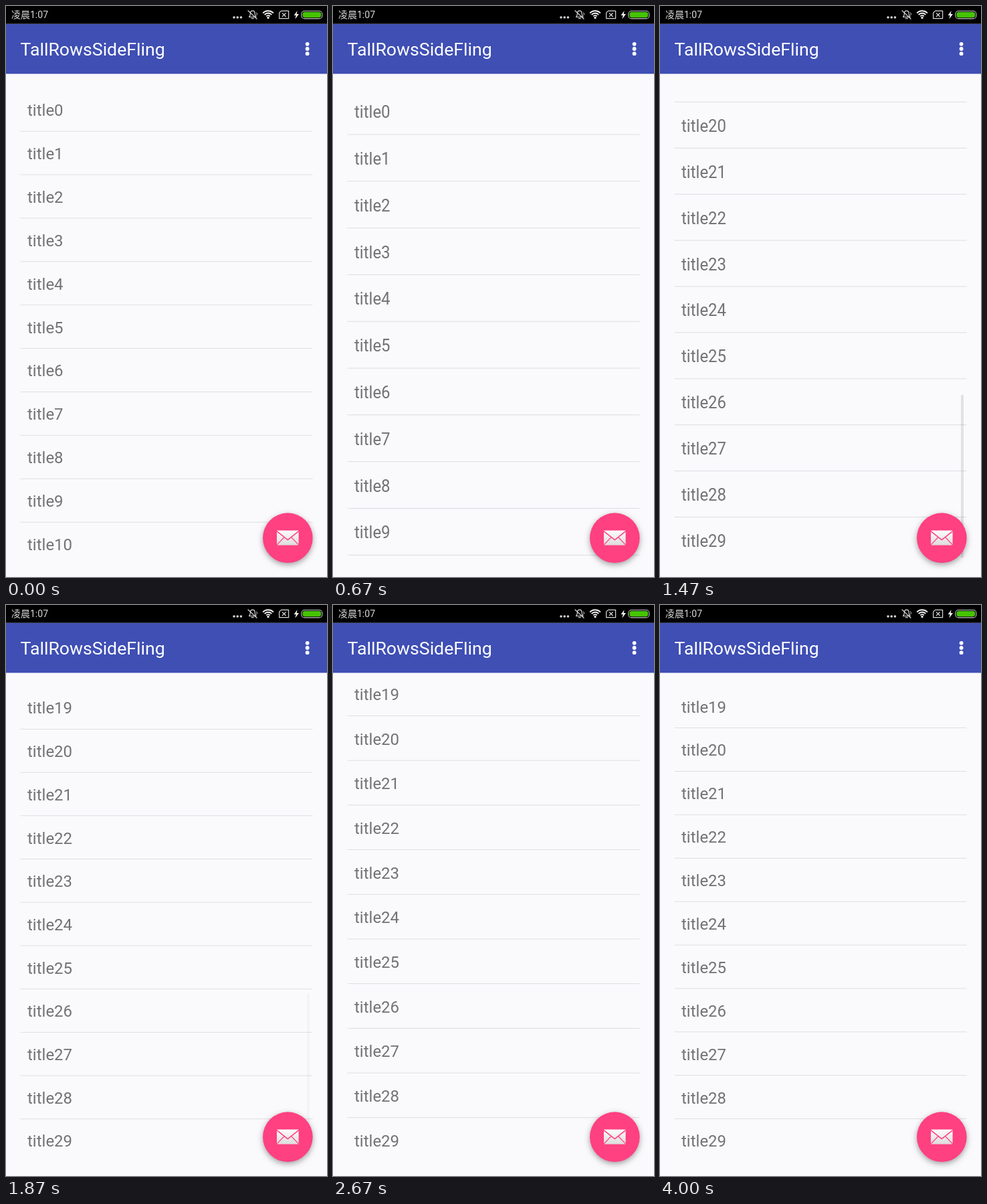
An HTML page with a canvas for the animation above (4.07 s loop, 480 by 853 pixels).

```html
<!DOCTYPE html>
<html lang="zh">
<head>
<meta charset="utf-8">
<title>Edge stretch list</title>
<style>
html, body { margin: 0; width: 100%; height: 100%; overflow: hidden; background: #faf9fc; }
canvas { display: block; width: 480px; height: 853px; }
</style>
</head>
<body>
<canvas id="stage"></canvas>
<script>
const W = 480, H = 853, LOOP = 4070, STEP = 1000 / 15;
const canvas = document.getElementById('stage');
const ctx = canvas.getContext('2d');
const dpr = window.devicePixelRatio || 1;
canvas.width = W * dpr;
canvas.height = H * dpr;

const PX = 480 / 1080;
const list = { x: 48 * PX, y: 276 * PX, w: 984 * PX, bottom: 832 };
const ROW = 146 * PX, DIV = 2 * PX, COUNT = 30;
const MAX_SCROLL = COUNT * ROW - DIV - (list.bottom - list.y);
const BG = '#faf9fc', PINK = '#ff4081';
const SANS = 'Roboto, "Noto Sans CJK SC", "Noto Sans CJK", sans-serif';

const clamp = v => Math.max(0, Math.min(1, v));

// Underdamped return from 1 to 0
function spring(s) {
  if (s > 0.46) return 0;
  return Math.exp(-11 * s) * (Math.cos(10.45 * s) + 1.052 * Math.sin(10.45 * s));
}

function bounce(t, start, rise, peak, release) {
  if (t < start) return 0;
  if (t < release) return peak * Math.sin(Math.PI / 2 * clamp((t - start) / rise));
  return peak * spring((t - release) / 1000);
}

// The screen updates 15 times a second, on 10 ms ticks
function snap(t) {
  let k = Math.floor(t / STEP + 0.1);
  if (Math.round(k * STEP / 10) * 10 > t) k--;
  return Math.min(k, 45) * STEP;
}

function pose(t) {
  let stretch;
  if (t < 1130) stretch = bounce(t, 70, 460, 0.0758, 666);
  else if (t < 2100) stretch = bounce(t, 1400, 130, 0.086, 1533);
  else stretch = bounce(t, 2170, 300, 0.1001, 2533);
  let pressed = -1;
  if (t > 190 && t < 660) pressed = 3;
  if (t > 2300 && t < 2530) pressed = 28;
  return {
    stretch, pressed,
    scroll: MAX_SCROLL * Math.pow(clamp((t - 1100) / 300), 1.6),
    pivot: t < 1130 ? list.y : list.bottom,
    bar: t < 1130 ? 0 : 0.1 * clamp((1930 - t) / 250)
  };
}

function rect(x, y, w, h, color) {
  ctx.fillStyle = color;
  ctx.fillRect(x, y, w, h);
}

function disc(x, y, r, color) {
  ctx.fillStyle = color;
  ctx.beginPath();
  ctx.arc(x, y, r, 0, Math.PI * 2);
  ctx.fill();
}

function text(str, x, y, size, color) {
  ctx.font = size + 'px ' + SANS;
  ctx.fillStyle = color;
  ctx.fillText(str, x, y);
}

function line(points, color, width) {
  ctx.strokeStyle = color;
  ctx.lineWidth = width;
  ctx.beginPath();
  points.forEach(([x, y], i) => i ? ctx.lineTo(x, y) : ctx.moveTo(x, y));
  ctx.stroke();
}

function drawList(p) {
  ctx.save();
  ctx.beginPath();
  ctx.rect(list.x, list.y, list.w, list.bottom - list.y);
  ctx.clip();
  ctx.save();
  ctx.translate(0, p.pivot);
  ctx.scale(1, 1 + p.stretch);
  ctx.translate(0, -p.pivot);
  for (let i = 0; i < COUNT; i++) {
    const y = list.y + i * ROW - p.scroll;
    if (y < list.y - 2 * ROW || y > list.bottom + ROW) continue;
    if (i < COUNT - 1) rect(list.x, y + ROW - DIV, list.w, DIV, '#dcdbde');
    if (i === p.pressed) rect(list.x, y - DIV, list.w, ROW + DIV, '#e6e5e7');
    text('title' + i, 32, y + 41.4, 24, '#737275');
  }
  ctx.restore();
  if (p.bar > 0) {
    const top = 131 + 450 * p.scroll / MAX_SCROLL;
    rect(450, top, 4, 243, `rgba(0,0,0,${p.bar})`);
  }
  ctx.restore();
}

function drawStatus() {
  const ink = '#d6d6d6';
  rect(0, 0, W, 26.67, '#000');
  text('凌晨1:07', 8, 18.3, 14, ink);
  for (const x of [341, 346.2, 351.4]) disc(x, 17, 1.8, ink);

  // muted bell
  ctx.lineCap = ctx.lineJoin = 'round';
  ctx.strokeStyle = ink;
  ctx.lineWidth = 1.2;
  ctx.beginPath();
  ctx.moveTo(363.5, 16.5);
  ctx.quadraticCurveTo(365.3, 15, 365.3, 11.5);
  ctx.bezierCurveTo(365.3, 5.6, 372.2, 5.6, 372.2, 11.5);
  ctx.quadraticCurveTo(372.2, 15, 374, 16.5);
  ctx.closePath();
  ctx.moveTo(367.2, 18.6);
  ctx.lineTo(370.4, 18.6);
  ctx.stroke();
  line([[362, 7], [375, 19.3]], ink, 1.2);
  line([[374.5, 10], [375.6, 12], [374.5, 14]], ink, 1);

  // wifi
  ctx.lineCap = 'butt';
  ctx.strokeStyle = '#f0f0f0';
  ctx.lineWidth = 1.9;
  for (const r of [3.8, 7.3, 10.8]) {
    ctx.beginPath();
    ctx.arc(392, 18, r, -Math.PI * 0.76, -Math.PI * 0.24);
    ctx.stroke();
  }
  disc(392, 17.6, 1.7, '#f0f0f0');

  // missing card
  ctx.strokeStyle = ink;
  ctx.lineWidth = 1.2;
  ctx.beginPath();
  ctx.moveTo(411.5, 7.3);
  ctx.lineTo(422.6, 7.3);
  ctx.lineTo(422.6, 18.7);
  ctx.lineTo(408.6, 18.7);
  ctx.lineTo(408.6, 10.2);
  ctx.closePath();
  ctx.stroke();
  line([[413, 10.5], [418.6, 16]], ink, 1.2);
  line([[418.6, 10.5], [413, 16]], ink, 1.2);

  // charging bolt
  ctx.fillStyle = '#f0f0f0';
  ctx.beginPath();
  ctx.moveTo(435.6, 7);
  ctx.lineTo(430.6, 14);
  ctx.lineTo(433.6, 14);
  ctx.lineTo(432.4, 19.5);
  ctx.lineTo(438, 12);
  ctx.lineTo(434.7, 12);
  ctx.closePath();
  ctx.fill();

  // battery
  ctx.beginPath();
  ctx.roundRect(441.8, 7.5, 31, 11.4, 4.5);
  ctx.strokeStyle = '#c8c8c8';
  ctx.lineWidth = 1.1;
  ctx.stroke();
  ctx.beginPath();
  ctx.roundRect(443.5, 9.1, 27.6, 8.2, 3.2);
  ctx.fillStyle = '#45c401';
  ctx.fill();
}

function drawToolbar() {
  rect(0, 26.67, W, 74.67, '#3f4fb4');
  text('TallRowsSideFling', 21.5, 74, 26.67, '#fff');
  for (const y of [56.8, 64, 71.2]) disc(450.6, y, 2.9, '#fff');
}

function drawButton() {
  ctx.save();
  ctx.shadowColor = 'rgba(0,0,0,0.36)';
  ctx.shadowBlur = 9 * dpr;
  ctx.shadowOffsetY = 3 * dpr;
  disc(421.33, 794.67, 37.33, PINK);
  ctx.restore();

  const l = 405, r = 437.6, top = 783.6, base = 805.6, mid = 421.3;
  const paper = ctx.createLinearGradient(0, top, 0, base);
  paper.addColorStop(0, '#fdfbfc');
  paper.addColorStop(1, '#dedcdd');
  ctx.fillStyle = paper;
  ctx.beginPath();
  ctx.roundRect(l, top, r - l, base - top, 1);
  ctx.fill();
  ctx.lineJoin = 'round';
  line([[l, top + 1], [mid, 797.6], [r, top + 1]], PINK, 1.5);
  line([[l, base - 0.5], [415.6, 794]], PINK, 1.2);
  line([[r, base - 0.5], [427, 794]], PINK, 1.2);
}

function draw(t) {
  ctx.setTransform(dpr, 0, 0, dpr, 0, 0);
  rect(0, 0, W, H, BG);
  drawList(pose(snap(t)));
  drawToolbar();
  drawStatus();
  drawButton();
}

let begin;
function tick(now) {
  if (begin === undefined) begin = now;
  draw((now - begin) % LOOP);
  requestAnimationFrame(tick);
}
requestAnimationFrame(tick);
</script>
</body>
</html>
```
